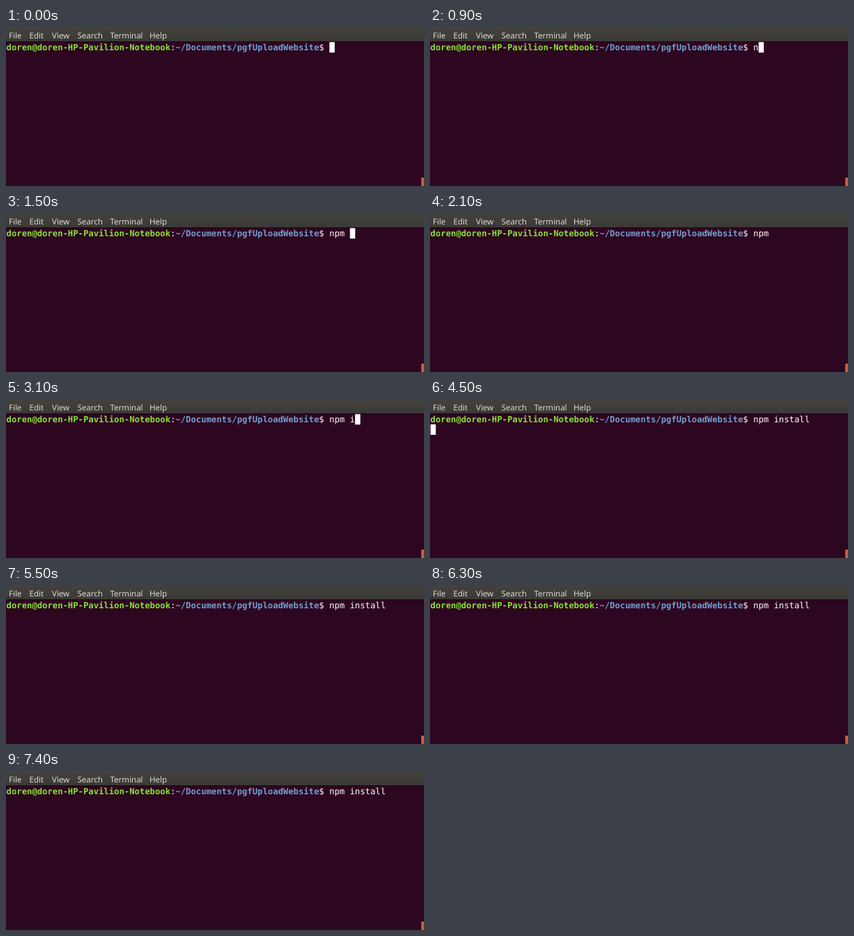
An HTML page for the animation above (8000 ms loop, 600x227 px).

```html
<!DOCTYPE html>
<html lang="en">
<head>
<meta charset="utf-8">
<title>Terminal</title>
<style>
  html, body { margin: 0; width: 100%; height: 100%; overflow: hidden; background: #2d0620; }
  svg { display: block; width: 600px; height: 227px; }
  text { text-rendering: geometricPrecision; }
  .menu { font: 11.6px "Open Sans", "Noto Sans", sans-serif; fill: #e6e2da; }
  .term { font: 12.22px "DejaVu Sans Mono", monospace; fill: #fff; white-space: pre; }
  .user { font-weight: bold; fill: #8ae234; }
  .path { font-weight: bold; fill: #729fcf; }
</style>
</head>
<body>
<svg viewBox="0 0 600 227">
  <defs>
    <linearGradient id="bar" x2="0" y2="1">
      <stop offset="0" stop-color="#42413c"/>
      <stop offset="1" stop-color="#3b3a36"/>
    </linearGradient>
  </defs>
  <rect width="600" height="227" fill="#2d0620"/>
  <rect width="600" height="19" fill="url(#bar)"/>
  <g class="menu">
    <text x="4" y="14.6">File</text>
    <text x="33.5" y="14.6">Edit</text>
    <text x="66" y="14.6">View</text>
    <text x="102.5" y="14.6">Search</text>
    <text x="149.5" y="14.6">Terminal</text>
    <text x="206" y="14.6">Help</text>
  </g>
  <text class="term" x="0.6" y="32.3"><tspan class="user">doren@doren-HP-Pavilion-Notebook</tspan>:<tspan class="path">~/Documents/pgfUploadWebsite</tspan>$ <tspan id="typed"></tspan></text>
  <rect id="cursor" width="7.5" height="15" fill="#fff"/>
  <rect x="596" y="215" width="4" height="12" fill="#cf5a3c"/>
</svg>
<script>
  const LOOP = 8000, CELL = 7.357, LEFT = 0.8, PROMPT_CELLS = 63;
  const COMMAND = "npm install";
  const ENTER = 4500;

  // Moment at which each character of the command appears
  const keys = [500, 1000, 1200, 1300, 3000, 3300, 3500, 3700, 3800, 3900, 4100];
  // The cursor starts visible and toggles at each of these moments
  const blinks = [100, 500, 1900, 2700, 5000, 5600, 6200, 6700, 7400];

  const typed = document.getElementById("typed");
  const cursor = document.getElementById("cursor");
  const passed = (times, t) => times.filter(time => time <= t).length;

  function draw(t) {
    const count = passed(keys, t);
    const entered = t >= ENTER;
    typed.textContent = COMMAND.slice(0, count);
    cursor.setAttribute("x", entered ? LEFT : LEFT + (PROMPT_CELLS + count) * CELL);
    cursor.setAttribute("y", entered ? 35 : 20.3);
    cursor.setAttribute("visibility", passed(blinks, t) % 2 ? "hidden" : "visible");
  }

  const start = performance.now();
  function tick() {
    draw((performance.now() - start) % LOOP);
    requestAnimationFrame(tick);
  }
  tick();
</script>
</body>
</html>
```
